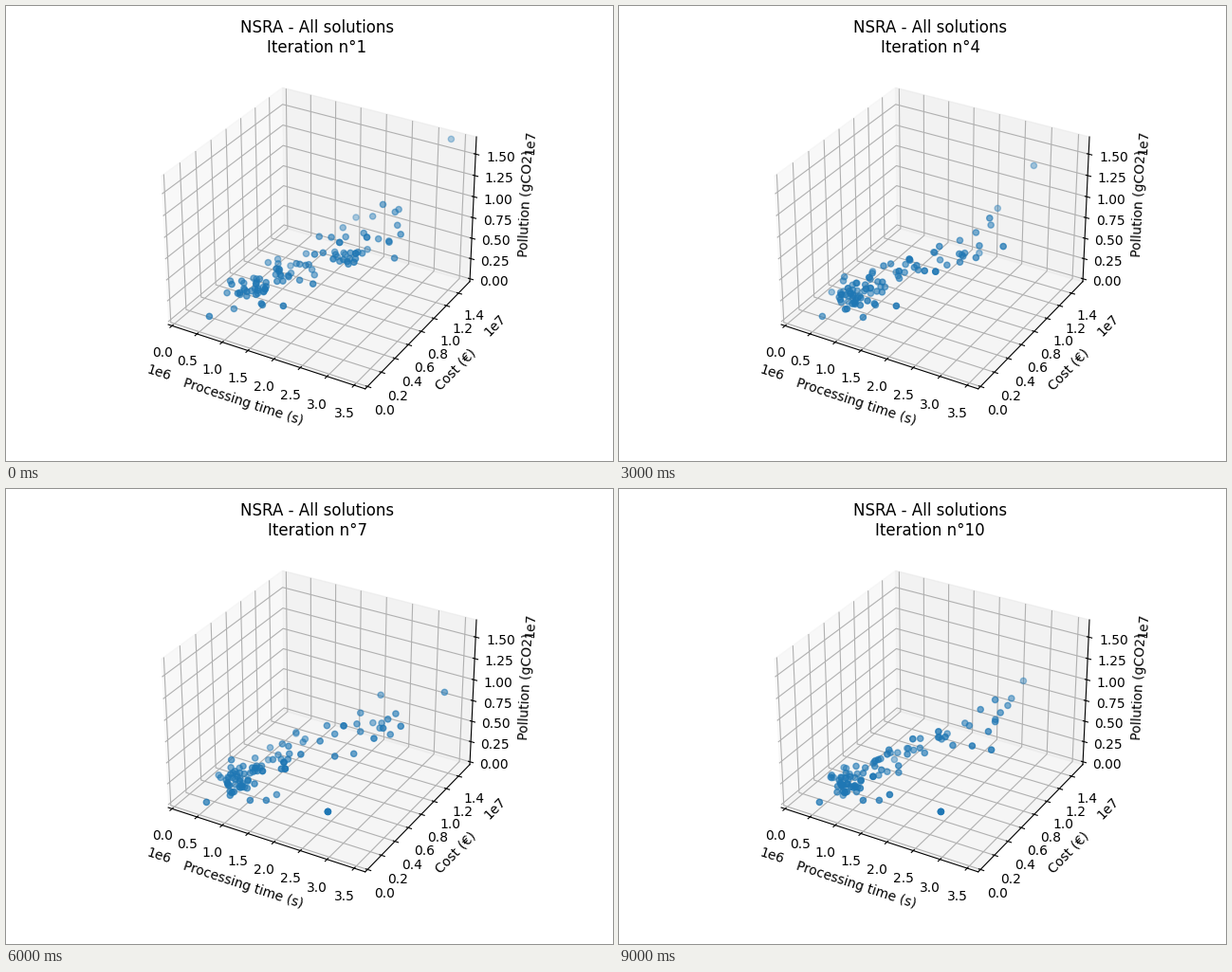
A matplotlib script for the animation above (10000 ms loop, 640x480 px).

```python
import numpy as np
import matplotlib.pyplot as plt
from matplotlib.animation import FuncAnimation

ITERATIONS = 10
BLUE = (31 / 255, 119 / 255, 180 / 255)

# Largest time, cost and pollution; the box is padded by 1/48 on each side.
TOP = np.array([3.626e6, 1.558e7, 1.664e7])
LOW, HIGH = -TOP / 48, TOP * 49 / 48

# Long-lived solutions: across, down, first and last iteration.
ELITE = [
    (214, 327, 1, 4), (292, 316, 1, 4), (270, 315, 1, 6), (240, 319, 1, 10),
    (257, 328, 2, 10), (211, 330, 6, 10), (274, 328, 6, 10),
    (285, 322, 6, 10), (339, 340, 6, 10), (339, 340, 6, 10),
]
# The costliest solution of each iteration.
WORST = [(469, 140), (445, 317), (456, 197), (437, 168), (437, 212),
         (473, 187), (462, 214), (462, 218), (468, 208), (426, 202)]


def make_pool(size=82):
    """Good solutions, ordered so that later ones sit closer to the optimum."""
    rng = np.random.default_rng(4)
    i = np.arange(size)
    across = 251 - 0.2 * i + (15 - 0.06 * i) * rng.triangular(-2, 0, 2, size)
    down = 299 + 0.11 * i + 10 * rng.triangular(-2, 0, 2, size)
    return np.column_stack([across, down])


POOL = make_pool()


def make_strays(rng, k):
    """Scattered solutions on a rising band, wider towards its far end."""
    count, bend = (72, 1.1) if k == 1 else (44, 1.4)
    t = rng.random(count) ** bend
    across = 262 + 155 * t
    down = 292 - 60 * t + (9 + 10 * t) * rng.triangular(-2, 0, 2, count)
    return np.column_stack([across, down])


def population(k):
    """View-plane places and opacities of all solutions in iteration k."""
    rng = np.random.default_rng(20 + k)
    elite = [(x, y) for x, y, first, last in ELITE if first <= k <= last]
    start = 4 * (k - 1)
    pool = POOL[start:start + (22 if k == 1 else 44)]
    strays = make_strays(rng, k)
    twins = strays[:4]
    p = np.vstack([elite, WORST[k - 1:k], pool, strays, twins])

    # Nearer solutions, low in the view, are more opaque.
    near = p[:, 1] - 320 + 0.36 * (p[:, 0] - 214)
    alpha = 0.65 + 0.004 * near + rng.normal(0, 0.07, len(p))
    return p, np.clip(alpha, 0.35, 0.95)


def to_data(p):
    """Put view-plane places on the plane through the middle of the box."""
    el, az = np.radians([30, -60])
    right = np.array([-np.sin(az), np.cos(az), 0])
    up = np.array([-np.sin(el) * np.cos(az), -np.sin(el) * np.sin(az),
                   np.cos(el)])
    box = np.array([4, 4, 3]) * 1.82946407 * 25 / 24 / np.sqrt(41)
    scale = 369.6 / 1.85
    h = (p[:, 0] - 332.6) / scale
    v = (237.0 - p[:, 1]) / scale
    spot = np.outer(h, right) + np.outer(v, up)
    return LOW + (spot / box + 0.5) * (HIGH - LOW)


fig = plt.figure(figsize=(6.4, 4.8), dpi=100)
ax = fig.add_subplot(projection="3d")
ax.set_xticks(np.arange(8) * 0.5e6)
ax.set_yticks(np.arange(8) * 0.2e7)
ax.set_zticks(np.arange(7) * 0.25e7)
ax.set_xlim(LOW[0], HIGH[0])
ax.set_ylim(LOW[1], HIGH[1])
ax.set_zlim(LOW[2], HIGH[2])
ax.set_xlabel("Processing time (s)")
ax.set_ylabel("Cost (€)")
ax.set_zlabel("Pollution (gCO2)")

dots = []


def draw(frame):
    k = frame + 1
    while dots:
        dots.pop().remove()
    p, alpha = population(k)
    colors = [(*BLUE, a) for a in alpha]
    dots.append(ax.scatter(*to_data(p).T, s=20, c=colors, depthshade=False))
    ax.set_title(f"NSRA - All solutions\nIteration n°{k}")
    return dots


anim = FuncAnimation(fig, draw, frames=ITERATIONS, interval=1000, repeat=True)
plt.show()
```
